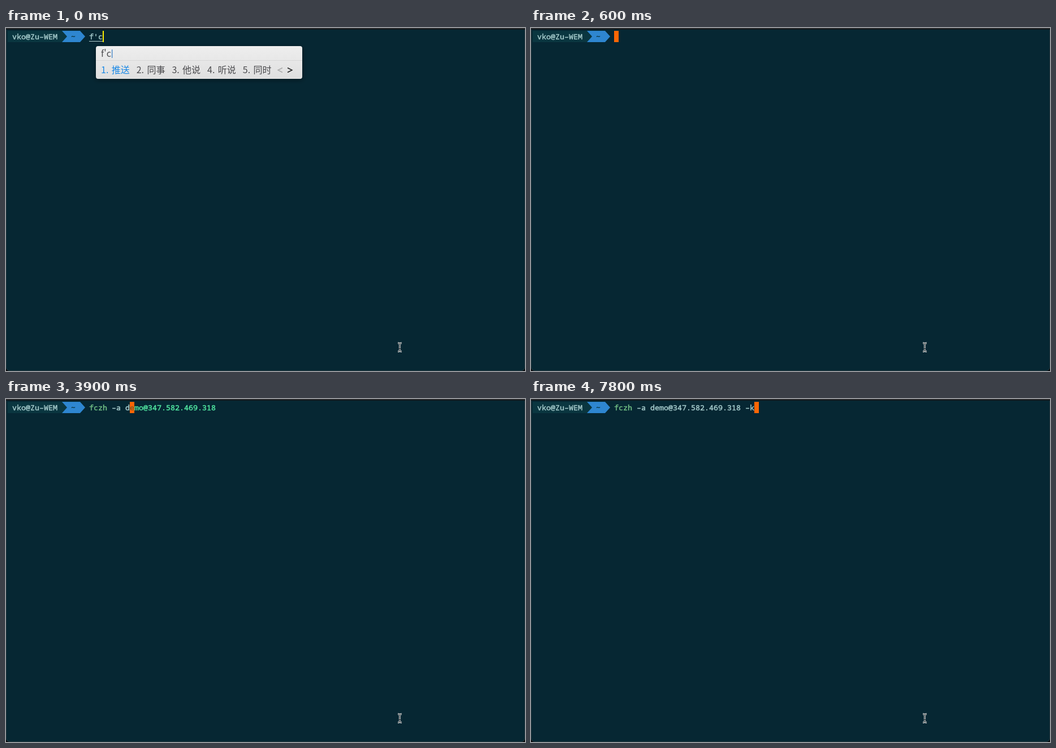
An HTML page with a canvas for the animation above (8000 ms loop, 918 by 607 pixels).

```html
<!DOCTYPE html>
<html lang="zh">
<head>
<meta charset="utf-8">
<title>Terminal</title>
<style>
  html, body { margin: 0; width: 100%; height: 100%; overflow: hidden; background: #000; }
  canvas { display: block; }
</style>
</head>
<body>
<canvas id="stage" width="918" height="607"></canvas>
<script>
const ctx = document.getElementById('stage').getContext('2d');

const LOOP = 8000;
const CELL = 8, LINE_TOP = 5, LINE_H = 20, BASELINE = 20, INPUT_X = 147;
const MONO = '13.333px "Noto Sans Mono", monospace';
const SANS = '16px "Noto Sans CJK SC", "Noto Sans CJK", sans-serif';
const BG = '#062733', TEXT = '#a6cbcc', COMMAND_TEXT = '#72c085', HINT = '#52e8a2';

const COMMAND = 'fczh';
const WITH_FLAG = COMMAND + ' –a';
const WITH_HOST = WITH_FLAG + ' demo@347.582.469.318';
const FULL = WITH_HOST + ' –k';

const SHORT_LIST = ['推送', '同事', '他说', '听说', '同时'];
const LONG_LIST = ['他是谁', null, '他说啥', '听说是', '他说是'];   // null: cloud result

// Either an input method composition or typed characters followed by a suggestion.
const STEPS = [
  { at: 0, preedit: "f'c", query: "f'c", list: SHORT_LIST },
  { at: 150, preedit: "f'c", query: "f'c'z", list: LONG_LIST },
  { at: 300, preedit: "f'c'zh", query: "f'c'zh", list: LONG_LIST },
  { at: 600, line: '', typed: 0 },
  { at: 750, line: WITH_FLAG, typed: 4 },
  { at: 1350, line: WITH_FLAG, typed: 5 },
  { at: 1500, line: WITH_FLAG, typed: 6 },
  { at: 1650, line: WITH_FLAG, typed: 7 },
  { at: 2250, line: WITH_HOST, typed: 8 },
  { at: 3900, line: WITH_HOST, typed: 9 },
  { at: 5400, line: WITH_HOST, typed: WITH_HOST.length },
  { at: 6450, line: FULL.slice(0, -2), typed: FULL.length - 2 },
  { at: 6750, line: FULL.slice(0, -1), typed: FULL.length - 1 },
  { at: 7800, line: FULL, typed: FULL.length }
];

function rect(x, y, w, h, color) {
  ctx.fillStyle = color;
  ctx.fillRect(x, y, w, h);
}

function text(str, x, y, color, font) {
  ctx.font = font;
  ctx.fillStyle = color;
  ctx.fillText(str, x, y);
}

// Terminal text is slightly heavier than the regular weight.
function monoText(str, x, color) {
  text(str, x, BASELINE, color, MONO);
  ctx.strokeStyle = color;
  ctx.lineWidth = 0.45;
  ctx.strokeText(str, x, BASELINE);
}

function polygon(color, ...points) {
  ctx.beginPath();
  points.forEach(([x, y]) => ctx.lineTo(x, y));
  ctx.closePath();
  ctx.fillStyle = color;
  ctx.fill();
}

function strokePath(path, color, width) {
  ctx.strokeStyle = color;
  ctx.lineWidth = width;
  ctx.stroke(path);
}

function drawWindow() {
  rect(0, 0, 918, 607, '#05090b');
  const frame = new Path2D();
  frame.roundRect(0.5, 2.5, 917, 604, [0, 0, 6, 6]);
  ctx.fillStyle = BG;
  ctx.fill(frame);
  strokePath(frame, 'rgba(150, 190, 200, .18)', 1);
  rect(0, 0, 918, 1, '#3a3839');
  rect(0, 1, 918, 2, '#11191d');
}

function drawPrompt() {
  const top = LINE_TOP, mid = top + LINE_H / 2, bottom = top + LINE_H;
  rect(3, top, 96, LINE_H, '#0a3640');
  polygon('#2e86d0', [99, top], [131, top], [140, mid], [131, bottom], [99, bottom]);
  polygon('#0a3640', [99, top], [108, mid], [99, bottom]);
  monoText('vko@Zu–WEM', 11, TEXT);
  monoText('~', 115, '#0a3640');
}

function drawCommandLine({ line, typed }) {
  const put = (from, to, color) =>
    monoText(line.slice(from, to), INPUT_X + from * CELL, color);
  put(0, COMMAND.length, COMMAND_TEXT);
  put(COMMAND.length, typed, TEXT);
  rect(INPUT_X + typed * CELL, LINE_TOP, CELL, LINE_H, '#ff6605');
  put(typed, typed + 1, '#8d5a20');
  put(typed + 1, line.length, HINT);
}

function drawPreedit(str) {
  const width = str.length * CELL;
  monoText(str, INPUT_X, TEXT);
  rect(INPUT_X, 23, width, 1, '#b5cfd0');
  rect(INPUT_X + width, LINE_TOP, 2, LINE_H, '#fff000');
}

function drawCloud(x) {
  const cloud = new Path2D('M5.5 14.5 A4.6 4.6 0 0 1 5.6 5.8 A6.6 6.6 0 0 1 17.7 5.2 A4.7 4.7 0 0 1 18 14.5 Z');
  ctx.save();
  ctx.translate(x, 67);
  strokePath(cloud, '#68686b', 2);
  ctx.restore();
}

function drawChevron(x, dir, color) {
  const y = 74.5;
  strokePath(new Path2D(`M${x - dir * 4} ${y - 4} L${x + dir * 4} ${y} L${x - dir * 4} ${y + 4}`), color, 1.4);
}

function drawPopup({ query, list }) {
  const left = 159, top = 32, height = 58, textX = 168, numberW = 18.7, gap = 12;
  const itemW = word => numberW + (word ? word.length : 2) * 16;
  const end = list.reduce((x, word) => x + itemW(word) + gap, textX) - gap;
  const width = Math.round(end + 54) - left;

  const fill = ctx.createLinearGradient(0, top, 0, top + height);
  fill.addColorStop(0, '#eeeeee');
  fill.addColorStop(1, '#dfdfdf');
  ctx.save();
  ctx.shadowColor = 'rgba(0, 0, 0, .45)';
  ctx.shadowBlur = 9;
  ctx.shadowOffsetY = 2;
  ctx.beginPath();
  ctx.roundRect(left, top, width, height, 4);
  ctx.fillStyle = fill;
  ctx.fill();
  ctx.restore();
  rect(left, 57, width, 1, '#d6d6d6');

  text(query, textX, 51, '#4a4a4d', SANS);
  rect(Math.round(textX + ctx.measureText(query).width) + 1, 38, 1.3, 15, '#3f83c6');

  let x = textX;
  list.forEach((word, i) => {
    const color = i ? '#4a4a4d' : '#1687e6';
    text(`${i + 1}.`, x, 80, color, SANS);
    if (word) text(word, x + numberW, 80, color, SANS);
    else drawCloud(x + 25.5);
    x += itemW(word) + gap;
  });
  drawChevron(end + 15.5, -1, '#aaaaaa');
  drawChevron(end + 32.5, 1, '#222222');
}

function drawPointer() {
  const beam = new Path2D('M693 557.5 Q696.5 557.5 696.5 560 V570 Q696.5 572.5 693 572.5 ' +
    'M700 557.5 Q696.5 557.5 696.5 560 M696.5 570 Q696.5 572.5 700 572.5 M695 567.5 H698');
  strokePath(beam, '#e4e8e9', 2.8);
  strokePath(beam, '#10181b', 1);
}

function draw(time) {
  const step = STEPS.findLast(s => s.at <= time);
  drawWindow();
  drawPrompt();
  if (step.list) {
    drawPreedit(step.preedit);
    drawPopup(step);
  } else {
    drawCommandLine(step);
  }
  drawPointer();
}

const start = performance.now();
function tick() {
  draw((performance.now() - start) % LOOP);
  requestAnimationFrame(tick);
}
tick();
</script>
</body>
</html>
```
